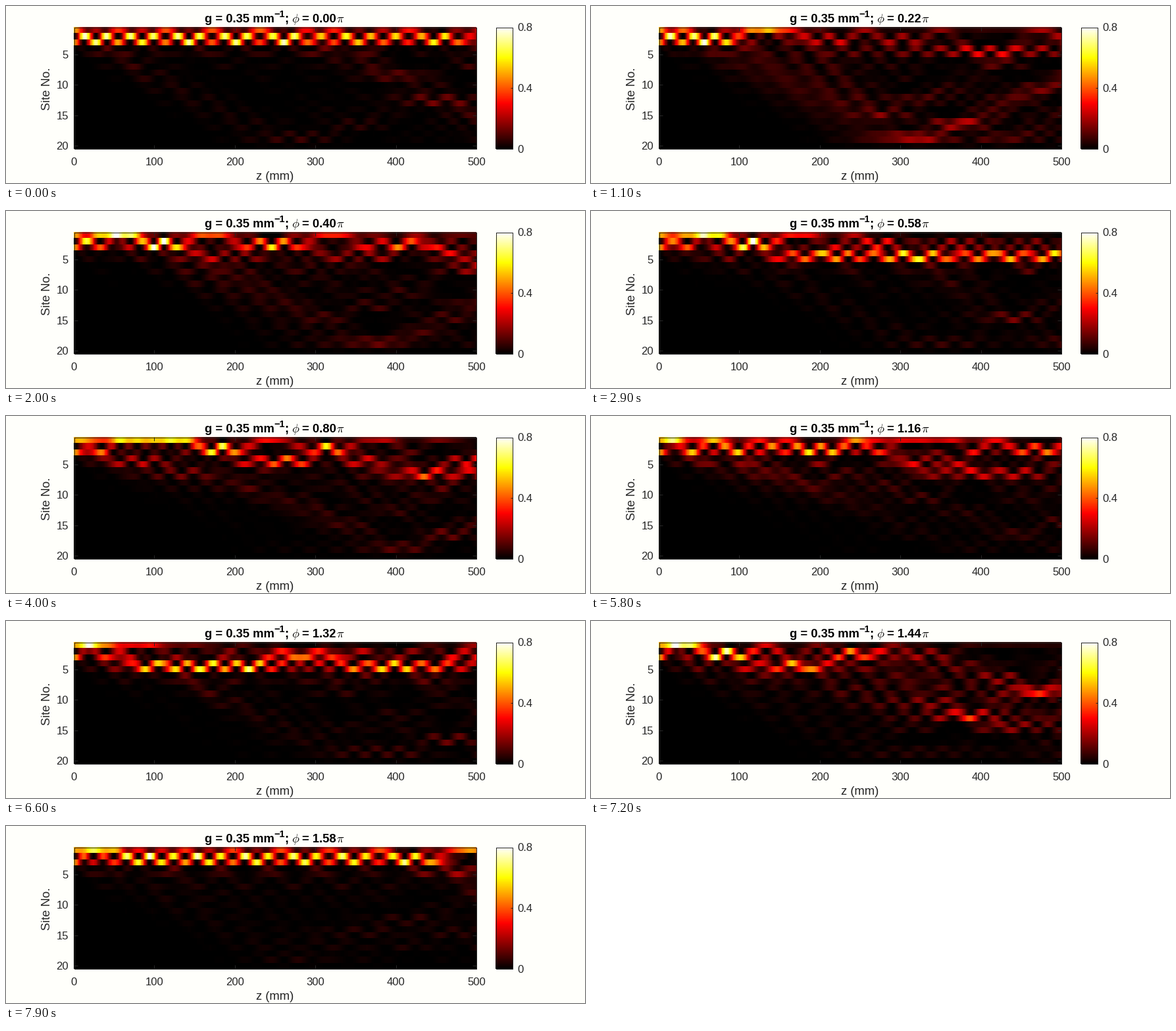
A matplotlib script for the animation above (8000 ms loop, 880 by 270 pixels).

```python
import numpy as np
import matplotlib.pyplot as plt
from matplotlib.animation import FuncAnimation
from matplotlib.colors import LinearSegmentedColormap

W, H = 880, 270
FRAMES, INTERVAL = 80, 100
SITES, LENGTH, VMAX = 20, 500, 0.8
J_WEAK, J_STRONG, G = 0.04, 0.10, 0.35

L, R, T, B = 103, 715, 32, 218      # heat map box in pixels
CL, CR = 744, 770                   # colour bar sides
INK = "#262626"
TICK_PT, LABEL_PT = 12, 13.2
HOT = LinearSegmentedColormap.from_list(
    "heat", [(0, "black"), (0.375, "red"), (0.75, "yellow"), (1, "white")])


def propagate(phases, per_mm=20):
    """Split-step solution of a nonlinear dimerised chain, one row per phase."""
    dz = 1 / per_mm
    bonds = np.where(np.arange(SITES - 1) % 2, J_STRONG, J_WEAK)
    vals, vecs = np.linalg.eigh(np.diag(bonds, 1) + np.diag(bonds, -1))
    hop = (vecs * np.exp(1j * vals * dz)) @ vecs.T

    psi = np.zeros((len(phases), SITES), complex)
    psi[:, 0] = np.sqrt(0.5)
    psi[:, 2] = np.sqrt(0.5) * np.exp(1j * phases)

    def kerr(p):
        return p * np.exp(0.5j * G * dz * (p.real**2 + p.imag**2))

    out = np.empty((len(phases), SITES, LENGTH + 1))
    out[:, :, 0] = np.abs(psi)**2
    for z in range(1, LENGTH + 1):
        for _ in range(per_mm):
            psi = kerr(kerr(psi) @ hop)
        out[:, :, z] = np.abs(psi)**2
    return out


phi = 0.02 * np.arange(FRAMES)
power = propagate(phi * np.pi)

plt.rcParams["font.family"] = "Liberation Sans"
fig = plt.figure(figsize=(W / 100, H / 100), dpi=100, facecolor="#fffffb")
ax = fig.add_axes([0, 0, 1, 1])
ax.axis("off")


def line(xs, ys, color=INK):
    ax.plot(xs, ys, color=color, lw=0.72, solid_capstyle="butt", zorder=3)


def box(x0, x1):
    line([x0 + .5, x1 - .5, x1 - .5, x0 + .5, x0 + .5],
         [T + .5, T + .5, B - .5, B - .5, T + .5])


def label(x, y, s, size=TICK_PT, color=INK, **kw):
    return ax.text(x, y, s, fontsize=size, color=color, va="baseline", **kw)


half = (R - L) / LENGTH / 2
heat = ax.imshow(power[0], cmap=HOT, vmin=0, vmax=VMAX, aspect="auto",
                 interpolation="nearest",
                 extent=[L - half, R + half, B, T])
heat.set_clip_path(plt.Rectangle((L, T), R - L, B - T, transform=ax.transData))
ax.imshow(np.linspace(1, 0, 256)[:, None], cmap=HOT, vmin=0, vmax=1,
          aspect="auto", interpolation="nearest", extent=[CL, CR, B, T])
ax.set(xlim=(0, W), ylim=(H, 0))

box(L, R)
box(CL, CR)
for z in range(0, LENGTH + 1, 100):
    x = L + (R - L) * z / LENGTH
    label(x, 243, str(z), ha="center")
    if 0 < z < LENGTH:
        line([x, x], [B, B - 6])
        line([x, x], [T, T + 6])
for n in range(5, SITES + 1, 5):
    y = T + (n - 0.5) * (B - T) / SITES
    label(95, y + 6, str(n), ha="right")
    line([L, L + 6], [y, y])
    line([R, R - 6], [y, y])
for v in ("0", "0.4", "0.8"):
    y = B - (B - T) * float(v) / VMAX
    label(777, y + 6, v)
    if v == "0.4":
        line([CR, CR - 3], [y, y])

label(409, 265, "z (mm)", LABEL_PT, ha="center")
label(67, 126, "Site No.", LABEL_PT, ha="center", rotation=90,
      rotation_mode="anchor")

bold = dict(size=LABEL_PT, color="black", weight="bold")
greek = dict(size=LABEL_PT, color="black", math_fontfamily="cm")
label(302, 25, "g = 0.35 mm", **bold)
label(407, 17, "\u22121", **{**bold, "size": 0.8 * LABEL_PT})
label(423, 25, ";", **bold)
label(434.5, 25, r"$\phi$", **greek)
value = label(450, 25, "", **bold)
label(502.5, 25, r"$\pi$", **greek)

# thin dark rim on the right and bottom edges
line([W - .5, W - .5], [0, H], "black")
line([0, W], [H - .5, H - .5], "black")


def update(i):
    heat.set_data(power[i])
    value.set_text(f"= {phi[i]:.2f}")
    return heat, value


anim = FuncAnimation(fig, update, frames=FRAMES, interval=INTERVAL,
                     repeat=True, repeat_delay=0, blit=False)
plt.show()
```
